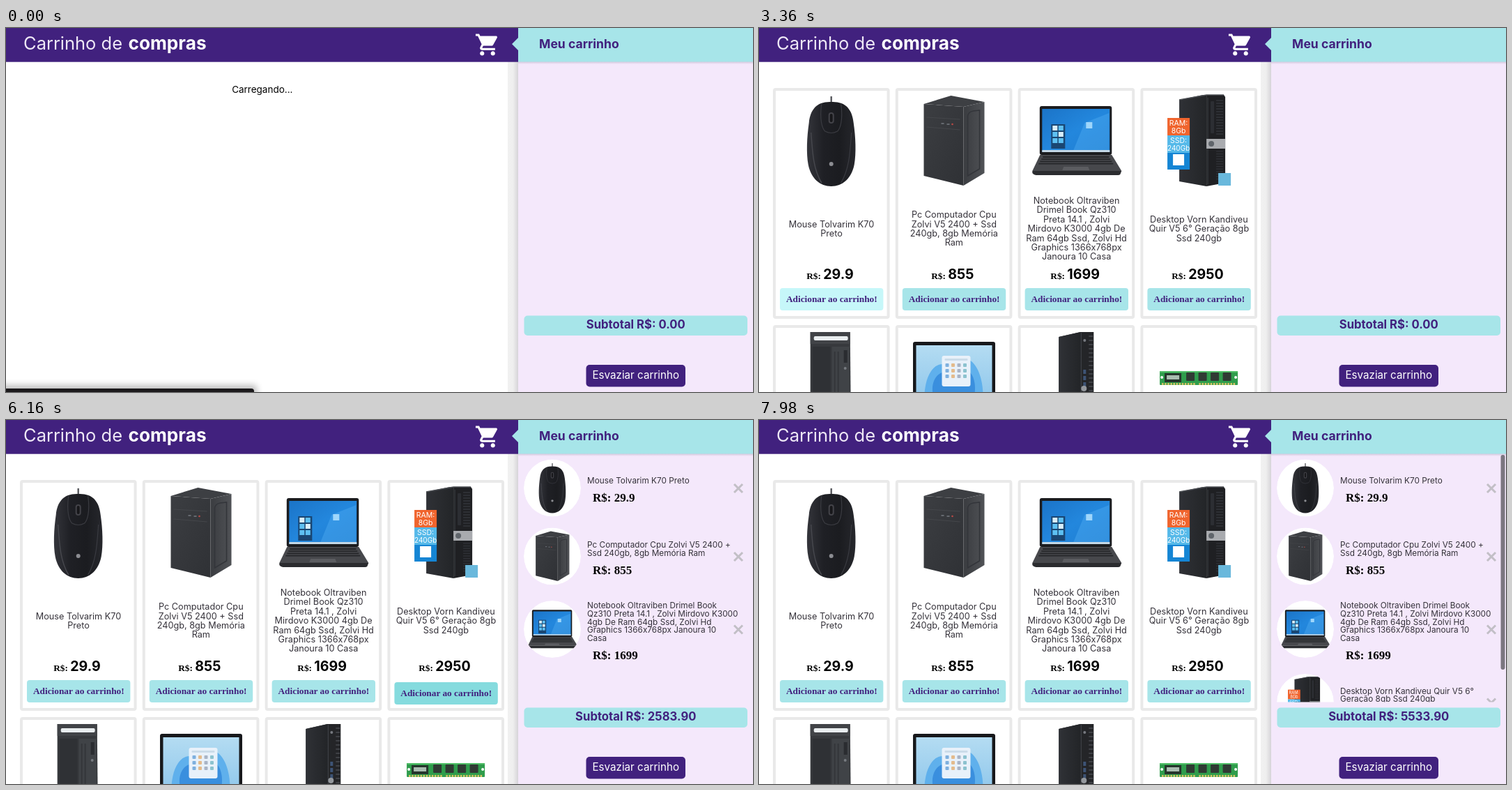
These frames come from a looping animation (1072 px wide and 522 px high, 8 s). An HTML page:

```html
<!DOCTYPE html>
<html lang="pt-BR">
<head>
<meta charset="utf-8">
<title>Carrinho de compras</title>
<style>
  html, body { margin: 0; width: 100%; height: 100%; overflow: hidden; background: #fff; }
  svg { display: block; width: 100vw; height: 100vh; }
  text { font-family: Inter, sans-serif; }
  .serif { font-family: "Liberation Serif", serif; font-weight: 700; }
</style>
</head>
<body>
<svg id="stage" viewBox="0 0 1072 522"></svg>
<script>
const LOOP = 8000, STEP = 70;
const PURPLE = '#41217e', AQUA = '#a7e5e9', INK = '#35323a';
const COL = i => 103.7 + 175.8 * i;

// Times: pointer in, press, release (item is added), pointer out
const products = [
  { price: 29.9, times: [2450, 3500, 3640, 3900], y: 97.5, art: mouse,
    card: ['Mouse Tolvarim K70', 'Preto'],
    row: ['Mouse Tolvarim K70 Preto'] },
  { price: 855, times: [4060, 4410, 4550, 4720], y: 195.5, art: computer,
    card: ['Pc Computador Cpu', 'Zolvi V5 2400 + Ssd', '240gb, 8gb Memória', 'Ram'],
    row: ['Pc Computador Cpu Zolvi V5 2400 +', 'Ssd 240gb, 8gb Memória Ram'] },
  { price: 1699, times: [4860, 5460, 5600, 5760], y: 300, art: notebook,
    card: ['Notebook Oltraviben', 'Drimel Book Qz310', 'Preta 14.1 , Zolvi', 'Mirdovo K3000 4gb De',
      'Ram 64gb Ssd, Zolvi Hd', 'Graphics 1366x768px', 'Janoura 10 Casa'],
    row: ['Notebook Oltraviben Drimel Book', 'Qz310 Preta 14.1 , Zolvi Mirdovo K3000',
      '4gb De Ram 64gb Ssd, Zolvi Hd', 'Graphics 1366x768px Janoura 10', 'Casa'] },
  { price: 2950, times: [5850, 6160, 6300, 6560], y: 405, art: desktop,
    card: ['Desktop Vorn Kandiveu', 'Quir V5 6° Geração 8gb', 'Ssd 240gb'],
    row: ['Desktop Vorn Kandiveu Quir V5 6°', 'Geração 8gb Ssd 240gb'] }
];
const scrollKeys = [[7000, 0], [7210, 30], [7420, 54], [7630, 54], [7910, 0]];

const rect = (x, y, w, h, fill, r = 0, more = '') =>
  `<rect x="${x}" y="${y}" width="${w}" height="${h}" rx="${r}" fill="${fill}" ${more}/>`;
const poly = (points, fill) => `<polygon points="${points}" fill="${fill}"/>`;
const path = (d, fill, stroke = 'none', w = 1) =>
  `<path d="${d}" fill="${fill}" stroke="${stroke}" stroke-width="${w}"/>`;
const circle = (x, y, r, fill) => `<circle cx="${x}" cy="${y}" r="${r}" fill="${fill}"/>`;
const text = (x, y, s, size, { weight = 400, fill = INK, mid = false, cls = '', id = '' } = {}) =>
  `<text x="${x}" y="${y}" font-size="${size}" font-weight="${weight}" fill="${fill}"` +
  `${mid ? ' text-anchor="middle"' : ''}${cls ? ` class="${cls}"` : ''}${id ? ` id="${id}"` : ''}>${s}</text>`;
const group = (x, y, body, scale = 1) => `<g transform="translate(${x} ${y}) scale(${scale})">${body}</g>`;
const grad = (id, dir, ...colors) => `<linearGradient id="${id}" x2="${dir[0]}" y2="${dir[1]}">` +
  colors.map((c, i) => `<stop offset="${i / (colors.length - 1)}" stop-color="${c}"/>`).join('') + '</linearGradient>';
const repeat = (n, fn) => Array.from({ length: n }, (_, i) => fn(i)).join('');

// Product pictures, centred on 0,0
function mouse() {
  return path('M0-64V-54', 'none', '#55565b', 2.4) +
    path('M0-56C20-57 30-46 32-26C35-6 36 18 33 34C29 54 16 65 0 65S-29 54-33 34C-36 18-35-6-32-26C-30-46-20-57 0-56Z', 'url(#shell)') +
    path('M-14-53C-17-30-13-18-9-14Q0-9 9-14C13-18 17-30 14-53', 'none', '#3a3b41', 1.2) +
    path('M-29-12C-27 16-26 40-14 60', 'none', '#46474d', 1.5) +
    path('M29-12C27 16 26 40 14 60', 'none', '#3a3b41', 1.2) +
    rect(-4, -41, 8, 16, '#434349', 4) + rect(-2, -39, 4, 12, '#17171a', 2) +
    circle(0, 33, 3, '#8c8d92');
}
function computer() {
  return poly('-43,-53 -4,-65 44,-56 14,-49', '#3d3f43') +
    poly('-43,-53 14,-49 14,64 -43,50', 'url(#face)') +
    poly('14,-49 44,-56 44,46 14,64', 'url(#panel)') +
    path('M-39-34L9-31M-39-20L9-16', 'none', '#45474b') +
    path('M20-36Q21-42 28-43L37-44V40L20 50Z', 'none', '#33353a', 1.6) +
    rect(-18, -26, 4, 2, '#666a70') + rect(-10, -25, 4, 2, '#666a70') + circle(-2, -24, 1.3, '#b94a45');
}
function notebook() {
  return rect(-52.5, -50, 103.5, 70, '#1b1c1f', 3) +
    rect(-49, -46, 97, 62, 'url(#screen)') +
    path('M-4 13L12-26L47-40V13Z', 'rgba(90,180,245,.35)') +
    rect(-36, -24, 20, 35, '#1a4672') +
    repeat(6, i => rect(-34 + i % 2 * 8.5, -22 + (i >> 1) * 9, 7, 7, i % 3 ? '#5ec0f2' : '#d8eefa')) +
    rect(14, -27, 9, 9, '#9fd6fb') +
    rect(-49, 13, 97, 3, '#c4d8e6') +
    poly('-52,20 51,20 65,43 -63,43', '#47484c') +
    repeat(4, i => path(`M${-48 - i * 2} ${23 + i * 3.2}H${47 + i * 2}`, 'none', '#26272a', 1.8)) +
    poly('-18,37 17,37 19,42 -20,42', '#5c5d61') +
    path('M-63 43H65L63 48Q62 49 60 49H-58Q-61 49-63 46Z', '#2b2c2f');
}
function tower() {
  return poly('-28,-59 6,-66 11,-66 11,65 -28,58', 'url(#side)') +
    poly('11,-66 36,-66 38,-63 38,60 11,65', '#1f2023') +
    path('M-28-59L11-66H36', 'none', '#4b4e53', 1.5) +
    path('M13-62V62', 'none', '#3c3e43') + rect(17, -57, 5, 46, '#2c2e33', 1) +
    repeat(13, i => path(`M25 ${-58 + i * 4}H35`, 'none', '#34363b', 1.4)) +
    repeat(12, i => path(`M25 ${15 + i * 3.6}H35`, 'none', '#303238', 1.3));
}
function desktop() {
  const white = { fill: '#fff', mid: true };
  return tower() + rect(11, -3, 27, 14, '#a9abaf') + circle(18, 4, 4, '#60656b') +
    rect(-45, -33, 32, 25, '#f0642d') + text(-29, -22, 'RAM:', 10.5, white) + text(-29, -11, '8Gb', 10.5, white) +
    rect(-45, -8, 32, 25, '#55b9e9') + text(-29, 3, 'SSD:', 10.5, white) + text(-29, 14, '240Gb', 10, white) +
    rect(-45, 17, 32, 24, '#1585d4') + rect(-37, 19, 16, 16, '#fff') +
    rect(28, 46, 18, 18, '#69b8dc');
}
function slimTower() {
  return poly('-30,-66 27,-66 28,40 -30,40', '#37393d') +
    rect(-30, -66, 57, 17, '#414347') + rect(-25, -60, 49, 6, '#e9edef', 2) +
    rect(-27, -45, 26, 80, '#2f3135') + rect(1, -45, 25, 80, '#404347') +
    path('M5-38V26M10-38V26', 'none', '#34363a', 2) + rect(18, -40, 5, 18, '#2a2c30') + circle(20, -14, 2, '#777b80');
}
function monitor() {
  return rect(-58.5, -52, 118, 80, '#17181b', 3) + rect(-54, -47, 109, 70, 'url(#sky)') +
    path('M-42 23C-40-10-24-26-8-18C10-40 40-30 42 23Z', '#5fb0ec') +
    path('M-30 23C-34 0-18-16 0-6C14-22 34-10 30 23Z', '#3a8fde') +
    rect(-17, -32, 41, 44, '#e8f1fa', 3) + rect(-13, -28, 33, 3, '#cbdce9', 1) +
    repeat(12, i => rect(-12 + i % 4 * 8.5, -21 + Math.floor(i / 4) * 8, 5, 5,
      ['#7fb0de', '#8cc2cf', '#a9b4c6', '#e3bb8c'][i * 3 % 4], 1));
}
function miniTower() {
  return poly('-25,-59 6,-66 25,-66 25,40 -25,40', '#242528') +
    poly('-25,-59 6,-66 6,40 -25,40', 'url(#side)') +
    repeat(16, i => path(`M18 ${-60 + i * 6}H24`, 'none', '#3f4146', 2)) +
    path('M7-65V40', 'none', '#43464c') + circle(12, -54, 2, '#777a80') +
    repeat(3, i => rect(10, -12 + i * 9, 4, 6, '#3d5375')) + circle(11, 15, 4, '#94989d');
}
function memory() {
  return rect(-56, -10, 112, 20, '#2f9d4c', 1) + rect(-56, -10, 112, 2, '#53be69') +
    rect(-49, -7, 24, 13, '#26352c') + rect(-46, -4, 18, 6, '#a9bdb0') +
    repeat(4, i => rect(-18 + i * 17.5, -8, 12, 12, '#303a34', 1)) +
    repeat(26, i => i === 12 ? '' : rect(-53 + i * 4.1, 7, 2.5, 3, '#d5c365')) +
    circle(-53, -1, 2, '#fff') + circle(53, -1, 2, '#fff');
}

const frame = (i, y) => rect(COL(i) - 81.7, y + 2, 163.6, 327, '#fff', 2, 'stroke="#e9e9e9" stroke-width="4"');

function card(p, i) {
  const x = COL(i), top = 292.2 - (p.card.length - 1) * 6.7;
  return frame(i, 86) + group(x, 162, p.art()) +
    p.card.map((s, n) => text(x + .3, top + n * 13.4, s, 12.7, { mid: true })).join('') +
    text(x - 1.7, 360, `<tspan class="serif" font-size="13.33">R$: </tspan><tspan>${p.price}</tspan>`, 19.6,
      { weight: 700, fill: '#000', mid: true }) +
    `<g id="button${i}">${rect(x - 73.7, 373, 148.4, 32, AQUA, 4)}` +
    text(x + .6, 393, 'Adicionar ao carrinho!', 13.33, { fill: PURPLE, mid: true, cls: 'serif' }) + '</g>';
}

function cartRow(p, i) {
  const extra = (p.row.length - 1) * 5.9;
  return `<g id="row${i}"><g transform="translate(784 ${p.y})"><g clip-path="url(#round)">` +
    circle(0, 0, 41, '#fff') + group(0, 0, p.art(), .555) + '</g>' +
    p.row.map((s, n) => text(50, -6.5 - extra + n * 11.8, s, 11.8)).join('') +
    text(58, 19.5 + extra, `R$: ${p.price}`, 17, { fill: '#000', cls: 'serif' }) +
    path('M261-5.5L273 6.5M273-5.5L261 6.5', 'none', '#c2bfc6', 3) + '</g></g>';
}

const CART = 'M7 18c-1.1 0-1.99.9-1.99 2S5.9 22 7 22s2-.9 2-2-.9-2-2-2zM1 2v2h2l3.6 7.59-1.35 2.45c-.16.28-.25.61-.25.96 0 1.1.9 2 2 2h12v-2H7.42c-.14 0-.25-.11-.25-.25l.03-.12.9-1.63h7.45c.75 0 1.41-.41 1.75-1.03l3.58-6.49c.08-.14.12-.31.12-.48 0-.55-.45-1-1-1H5.21l-.94-2H1zm16 16c-1.1 0-1.99.9-1.99 2s.89 2 1.99 2 2-.9 2-2-.9-2-2-2z';

document.getElementById('stage').innerHTML = '<defs>' +
  grad('shell', [1, 0], '#34353b', '#1f2025', '#1b1c20', '#26272c') +
  grad('face', [1, 1], '#3c3e42', '#2f3135') +
  grad('panel', [1, 0], '#3a3c40', '#505256') +
  grad('side', [1, 0], '#2f3136', '#232528') +
  grad('screen', [1, 1], '#1b74c8', '#2387dd', '#1f7dd0') +
  grad('sky', [0, 1], '#b4dcf2', '#93c9ec') +
  grad('edge', [1, 0], '#f1f1f1', '#efefef', '#d6d4d8') +
  grad('drop', [0, 1], 'rgba(80,70,100,.22)', 'rgba(80,70,100,0)') +
  '<clipPath id="round"><circle r="41"/></clipPath>' +
  '<clipPath id="list"><rect x="735" y="48" width="337" height="356.5"/></clipPath>' +
  '<filter id="soft" x="-20%" y="-400%" width="140%" height="900%"><feGaussianBlur stdDeviation="5"/></filter></defs>' +
  rect(0, 0, 1072, 522, '#fff') +
  `<g id="loading">${text(367.8, 93, 'Carregando...', 13.5, { fill: '#000', mid: true })}</g>` +
  `<g id="shop">${products.map(card).join('')}` +
  [slimTower, monitor, miniTower, memory].map((art, i) => frame(i, 426) + group(COL(i), 502, art())).join('') + '</g>' +
  rect(720, 48, 15, 474, 'url(#edge)') +
  `<g id="bar">${rect(-10, 512, 370, 20, '#000', 4, 'opacity=".25" filter="url(#soft)"')}${rect(-6, 517, 362, 12, '#1b191b', 4)}</g>` +
  rect(0, 0, 735, 48.7, PURPLE) +
  text(25, 31, 'Carrinho de', 25.5, { weight: 400, fill: '#eee8f6' }) +
  text(175.5, 31, 'compras', 26.2, { weight: 700, fill: '#fff' }) +
  `<path d="${CART}" fill="#fff" transform="translate(672.4 5.4) scale(1.55)"/>` +
  rect(735, 48, 337, 474, '#f4e8fb') +
  `<g clip-path="url(#list)"><g id="rows">${products.map(cartRow).join('')}</g></g>` +
  rect(1064.5, 50, 6, 308, '#7b7680', 3, 'id="thumb"') +
  rect(735, 48, 337, 4, 'url(#drop)') +
  rect(735, 0, 337, 48.5, AQUA) + poly('726,23 736,13 736,33', AQUA) +
  text(765, 28.5, 'Meu carrinho', 17.6, { weight: 700, fill: PURPLE }) +
  rect(743.5, 412.5, 320.5, 28.5, AQUA, 5) +
  text(903.8, 431, '', 16.7, { weight: 700, fill: PURPLE, mid: true, id: 'total' }) +
  rect(832.5, 483, 142.5, 31.5, PURPLE, 5) +
  text(903.7, 503, 'Esvaziar carrinho', 15.2, { weight: 400, fill: '#fff', mid: true });

const el = id => document.getElementById(id);
const show = (id, on) => el(id).setAttribute('display', on ? 'inline' : 'none');

function scrollAt(t) {
  const n = scrollKeys.findIndex(k => k[0] > t);
  if (n < 1) return 0;
  const [t0, a] = scrollKeys[n - 1], [t1, b] = scrollKeys[n];
  return a + (b - a) * (t - t0) / (t1 - t0);
}

function draw(t) {
  show('bar', t < 280);
  show('loading', t < 420);
  show('shop', t >= 420);
  let total = 0;
  products.forEach((p, i) => {
    const [enter, press, release, leave] = p.times;
    const down = t >= press && t < release, over = t >= enter && t < leave;
    const button = el('button' + i);
    button.setAttribute('transform', `translate(0 ${down ? 3 : 0})`);
    button.firstChild.setAttribute('fill', down ? '#85dbde' : over ? '#c6f7f9' : AQUA);
    show('row' + i, t >= release);
    if (t >= release) total += p.price;
  });
  el('total').textContent = 'Subtotal R$: ' + total.toFixed(2);
  const y = scrollAt(t);
  el('rows').setAttribute('transform', `translate(0 ${-y})`);
  el('thumb').setAttribute('y', 50 + y * 355 / 409);
  show('thumb', t >= 7000);
}

const start = performance.now();
function tick() {
  const t = (performance.now() - start) % LOOP;
  draw(Math.floor(t / STEP) * STEP);
  requestAnimationFrame(tick);
}
tick();
</script>
</body>
</html>
```
